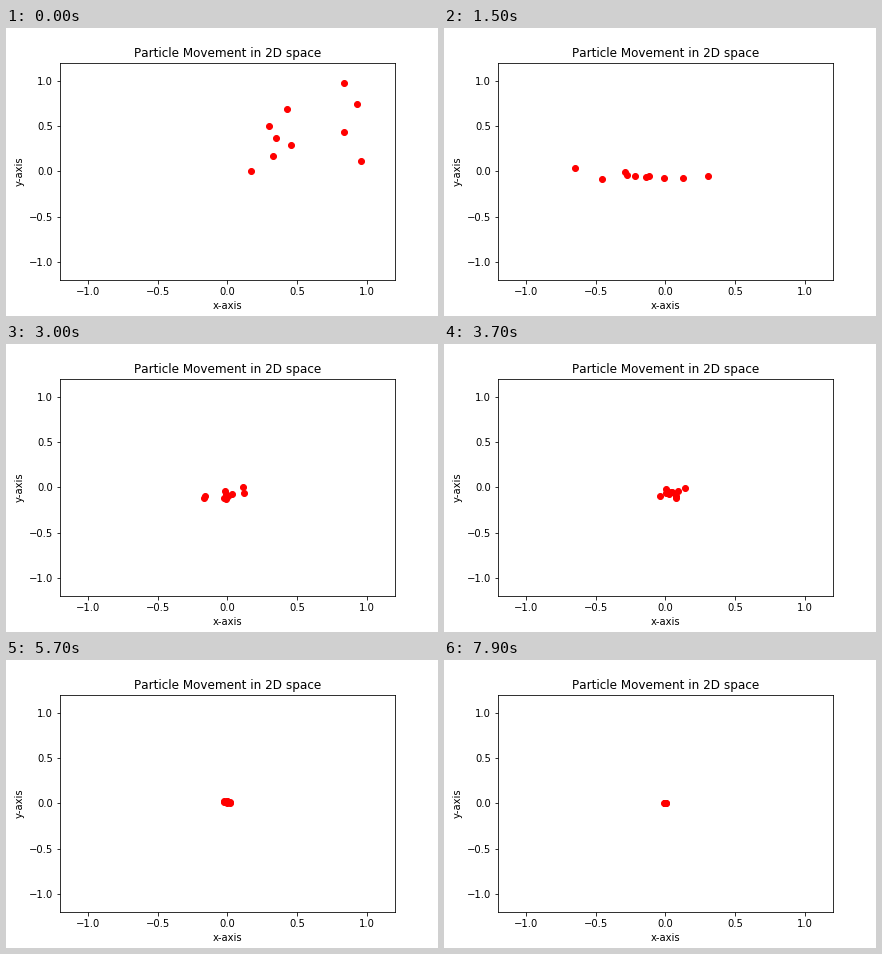
These frames come from a looping animation (432 px wide and 288 px high, 8 s). A matplotlib script:

```python
import numpy as np
import matplotlib.pyplot as plt
from matplotlib.animation import FuncAnimation

FRAMES, INTERVAL = 80, 100
DECAY = .935                            # amplitude kept per step
OMEGA = 2 * np.pi / np.array([9, 8])    # swing rate in x and y
PASS = 6                                # step at which the swarm has crossed over

# Each particle is set by where it starts and where it crosses over
start = np.array([(.96, .11), (.836, .97), (.93, .74), (.43, .69), (.30, .50),
                  (.836, .43), (.35, .37), (.455, .29), (.33, .17), (.17, 0)])
crossed = np.array([(-1.19, .01), (-.526, -.66), (-.50, -.615), (.555, -.59),
                    (-.21, -.48), (.235, -.47), (-.40, -.38), (-.254, -.36),
                    (-.834, -.32), (-.024, -.205)])
kick = (crossed / DECAY ** PASS - start * np.cos(OMEGA * PASS)) / np.sin(OMEGA * PASS)


def swarm(step):
    """Damped swing of every particle around the origin."""
    phase = OMEGA * step
    return DECAY ** step * (start * np.cos(phase) + kick * np.sin(phase))


plt.rcParams["text.kerning_factor"] = 6
fig, ax = plt.subplots(figsize=(6, 4), dpi=72)
fig.subplots_adjust(left=.125, right=.9, bottom=.125, top=.88)
ticks = np.arange(-1, 1.1, .5)
ax.set(xlim=(-1.2, 1.2), ylim=(-1.2, 1.2), xticks=ticks, yticks=ticks,
       xlabel="x-axis", ylabel="y-axis", title="Particle Movement in 2D space")
dots, = ax.plot([], [], "o", color="red", markersize=6)


def update(step):
    dots.set_data(*swarm(step).T)
    return dots,


anim = FuncAnimation(fig, update, frames=FRAMES, interval=INTERVAL,
                     repeat=True, repeat_delay=0)
plt.show()
```
